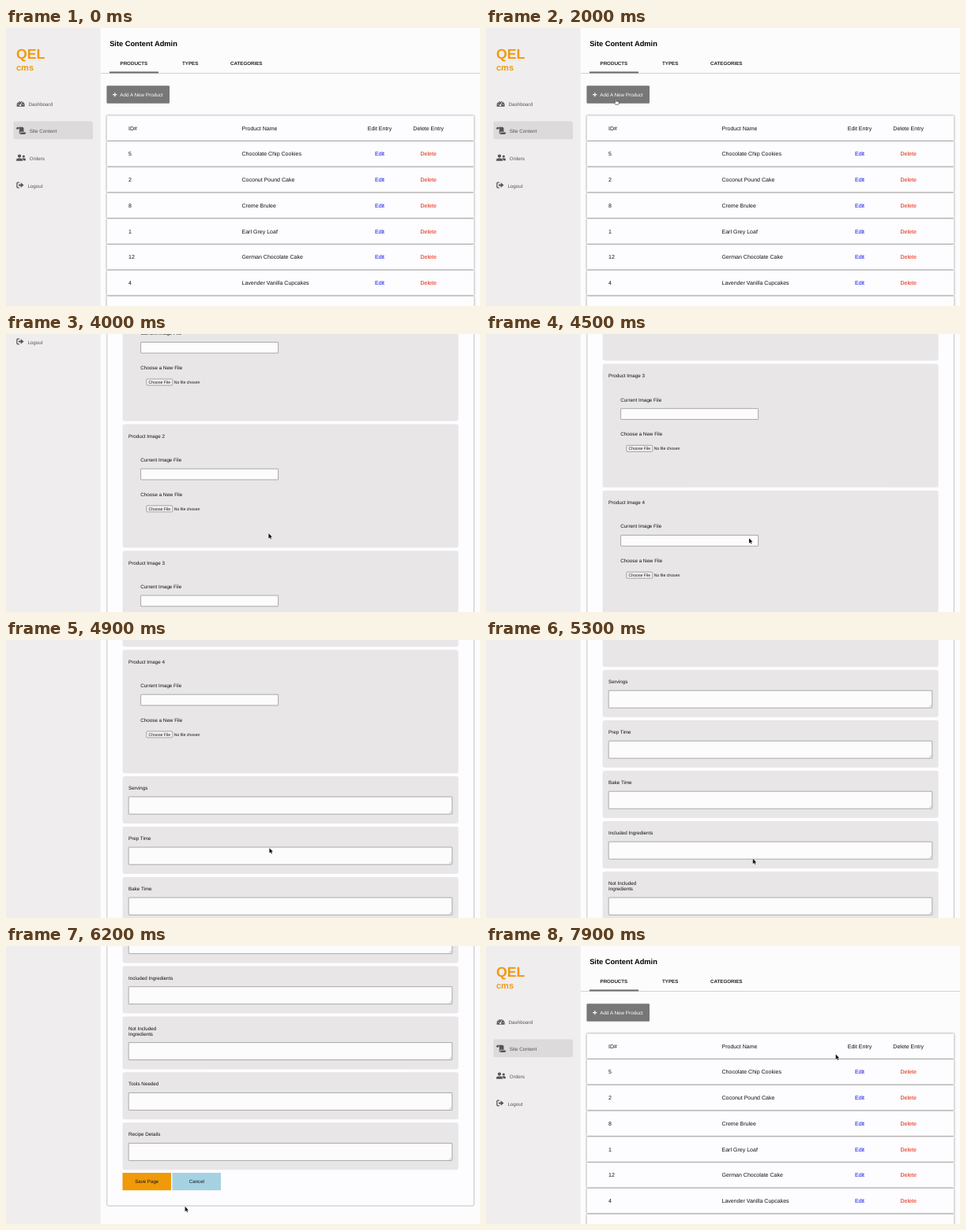
An HTML page for the animation above (8 s loop, 600 by 353 pixels).

```html
<!DOCTYPE html>
<html lang="en">
<head>
<meta charset="utf-8">
<title>Site Content Admin</title>
<style>
  html, body { margin: 0; width: 100%; height: 100%; overflow: hidden; background: #fdfcfd; }
  svg { display: block; position: absolute; left: 0; top: 0; }
  text { font-family: "Liberation Sans", Arial, Helvetica, sans-serif; fill: #111; text-rendering: geometricPrecision; }
  .bold { font-weight: 700; }
  .nav { fill: #555; }
  .mid { text-anchor: middle; }
  .row { fill: #fdfcfe; filter: drop-shadow(0 .5px 1px rgba(0, 0, 0, .55)); }
  .panel { fill: #e8e6e7; }
  .field { fill: #fdfcfd; stroke: #8c8b8c; stroke-width: .7; }
  .icon { fill: #555; }
  .line { fill: none; stroke: #555; stroke-width: 1.3; }
</style>
</head>
<body>
<svg id="stage" width="600" height="353" viewBox="0 0 600 353"></svg>
<script>
const LOOP = 8000, STEP = 100;
const FORM_AT = 2200, LIST_AT = 7300;

// y is the middle of the capitals
const text = (x, y, size, str, cls = '', fill = '') =>
  `<text x="${x}" y="${y + size * .355}" font-size="${size}" class="${cls}"${fill && ` style="fill:${fill}"`}>${str}</text>`;
const rect = (x, y, w, h, attrs = '') =>
  `<rect x="${x}" y="${y}" width="${w}" height="${h}" ${attrs}/>`;
const path = (d, attrs = '') => `<path d="${d}" ${attrs}/>`;

function sidebar() {
  const gauge = path('M13.6 99.7A5.2 5.2 0 1 1 23.6 99.7Z', 'class="icon"') +
    path('M18.2 98.2L20.6 93.6', 'stroke="#efedee" stroke-width=".9"') +
    '<circle cx="18.2" cy="98" r="1.2" fill="#efedee"/>' +
    [[15.4, 97.2], [16.2, 94.8], [18.3, 93.4], [21.7, 97.2]]
      .map(([x, y]) => `<circle cx="${x}" cy="${y}" r=".6" fill="#efedee"/>`).join('');
  const scroll = path('M13.2 128.6V127.4a1.6 1.6 0 0 1 3.2 0v1.2Z', 'class="icon"') +
    path('M15.4 125.8H20.6a1.9 1.9 0 0 1 1.9 1.9V131.7H17.9V133a1.2 1.2 0 0 1-1.2 1.2Q17 130 16.9 127.6Q16.8 126.3 15.4 125.8Z', 'class="icon"') +
    path('M18.7 132.4H25.2V133a2 2 0 0 1-2 2H17.2Q18.7 134.3 18.7 132.4Z', 'class="icon"');
  const people = '<circle cx="17" cy="162.6" r="2.1" class="icon"/><circle cx="22.3" cy="163" r="1.6" class="icon"/>' +
    path('M13.1 168.8V167.6Q13.1 165.4 15.3 165.4H18.7Q20.9 165.4 20.9 167.6V168.8Z', 'class="icon"') +
    path('M20.4 165.3H23Q25 165.3 25 167.2V168.2H21.6Q21.7 166.3 20.4 165.3Z', 'class="icon"');
  const leave = path('M16.8 196.2H15Q13.9 196.2 13.9 197.3V201.7Q13.9 202.8 15 202.8H16.8', 'class="line"') +
    path('M16 198.4H18.7V196.2L22.5 199.5L18.7 202.8V200.6H16Z', 'class="icon"');
  return text(13, 32.8, 17.6, 'QEL', 'bold', '#f09a10') +
    text(13, 50, 11, 'cms', 'bold', '#f09a10') +
    rect(9.5, 118.5, 100.5, 22.8, 'rx="2" fill="#dcdadb"') +
    gauge + scroll + people + leave +
    text(28.6, 96.7, 6.24, 'Dashboard', 'nav') +
    text(29.8, 131.2, 6.24, 'Site Content', 'nav') +
    text(29.8, 165.8, 6.24, 'Orders', 'nav') +
    text(27.4, 200.3, 6.24, 'Logout', 'nav');
}

function header() {
  return text(131.2, 20, 9.27, 'Site Content Admin', 'bold', '#000') +
    text(144.5, 44.8, 6.2, 'PRODUCTS', 'bold', '#222') +
    text(223, 44.8, 6.2, 'TYPES', 'bold', '#222') +
    text(284, 44.8, 6.2, 'CATEGORIES', 'bold', '#222') +
    rect(120, 57, 480, .8, 'fill="#c9c8ca"') +
    rect(131, 55.4, 62, 2, 'fill="#6b6b6b"');
}

function list() {
  const items = [[5, 'Chocolate Chip Cookies'], [2, 'Coconut Pound Cake'], [8, 'Creme Brulee'],
    [1, 'Earl Grey Loaf'], [12, 'German Chocolate Cake'], [4, 'Lavender Vanilla Cupcakes']];
  const top = i => 111.2 + i * 32.75;
  const row = i => rect(127.5, top(i), 465, 31.9, 'rx="1" class="row"');
  let out = rect(127.4, 73.2, 79.6, 22.6, 'rx="1.2" fill="#777"') +
    path('M135.2 84.6H140.4M137.8 82V87.2', 'stroke="#fff" stroke-width="1.1"') +
    text(144.3, 84.6, 6.3, 'Add A New Product', '', '#fff') +
    row(0) + text(155, 127.2, 7.04, 'ID#') + text(298.5, 127.2, 7.04, 'Product Name') +
    text(473, 127.2, 7.04, 'Edit Entry', 'mid') + text(534.7, 127.2, 7.04, 'Delete Entry', 'mid');
  items.forEach(([id, name], i) => {
    const y = top(i + 1) + 16;
    out += row(i + 1) + text(155, y, 7.04, id) + text(298.5, y, 7.04, name) +
      text(473, y, 7.04, 'Edit', 'mid', '#1010e8') + text(534.7, y, 7.04, 'Delete', 'mid', '#e0240f');
  });
  return out + row(7);
}

const panel = (y, h) => rect(147.6, y, 425, h, 'rx="3" class="panel"');
const label = (x, y, str) => text(x, y, 6.27, str);
const field = (x, y, w, h) => rect(x, y, w, h, 'rx=".6" class="field"');

function imagePanel(i) {
  const y = 143.6 + i * 160.8;
  return panel(y, 156.8) + label(155, y + 15.2, 'Product Image ' + (i + 1)) +
    label(170.3, y + 45.5, 'Current Image File') + field(170.6, y + 56.8, 174, 13.8) +
    label(170.3, y + 89.3, 'Choose a New File') +
    rect(177.8, y + 103.5, 33, 8, 'rx="1.2" fill="#f1f0f1" stroke="#777" stroke-width=".6"') +
    text(180.6, y + 107.5, 5.15, 'Choose File') + text(212.8, y + 107.5, 5.15, 'No file chosen');
}

function areaPanel(y, ...lines) {
  const extra = (lines.length - 1) * 7;
  const base = y + 26.2 + extra;
  return panel(y, 60 + extra) +
    lines.map((str, i) => label(155, y + 15 + i * 7.1, str)).join('') +
    field(155.2, base, 409.6, 22) +
    path(`M561 ${base + 21}l3-3M562.8 ${base + 21}l1.2-1.2`, 'stroke="#999" stroke-width=".5"');
}

function form() {
  return rect(127.8, 73.3, 464.6, 1209.7, 'rx="2" fill="#fdfcfe" stroke="#c3c2c5" stroke-width="1"') +
    panel(93, 46.8) + label(155, 108, 'Product Name') + field(155.2, 119.2, 409.6, 13.8) +
    [0, 1, 2, 3].map(imagePanel).join('') +
    areaPanel(786.5, 'Servings') + areaPanel(850.5, 'Prep Time') +
    areaPanel(914.5, 'Bake Time') + areaPanel(978.5, 'Included Ingredients') +
    areaPanel(1042.4, 'Not Included', 'Ingredients') +
    areaPanel(1113.2, 'Tools Needed') + areaPanel(1177.2, 'Recipe Details') +
    rect(147.5, 1241, 61.5, 22.2, 'fill="#f09a08"') + text(178.2, 1252.2, 6.15, 'Save Page', 'mid') +
    rect(210.5, 1241, 61.5, 22.2, 'fill="#a5d2e2"') + text(241.4, 1252.2, 6.15, 'Cancel', 'mid');
}

const arrow = path('M0 0V6.4L1.5 5L2.5 7.3L3.5 6.9L2.5 4.6H4.5Z',
  'id="arrow" fill="#111" stroke="#fff" stroke-width=".6" paint-order="stroke"');
const hand = path('M-.7 .6Q0-.4 .7 .6V3Q1.6 2.4 2 3.2Q2.8 2.8 3.2 3.6Q4 3.6 4 4.4Q4 6 3.2 7H-.6Q-1.4 5.6-2.3 4.5Q-2-.2+3.6-.7 4.4Z'.replace('Q-2-.2+3.6-.7 4.4', 'Q-2 3.6-.7 4.3'),
  'id="hand" fill="#fff" stroke="#222" stroke-width=".6"');

const stage = document.getElementById('stage');
stage.innerHTML = rect(0, 0, 600, 353, 'fill="#fdfcfd"') + rect(0, 0, 119.8, 353, 'fill="#efedee"') +
  `<g id="page">${sidebar()}${header()}<g id="list">${list()}</g><g id="form">${form()}</g></g>` +
  `<g id="cursor">${arrow}${hand}</g>`;
const [page, listView, formView, cursor, arrowTip, handTip] =
  ['page', 'list', 'form', 'cursor', 'arrow', 'hand'].map(id => document.getElementById(id));

// [time, scroll]
const scrollKeys = [[2800, 0], [3100, 50], [3400, 110], [3500, 110], [3700, 128], [4000, 190],
  [4300, 322], [4600, 480], [4900, 613.6], [5100, 688], [5300, 748.5], [5600, 842], [5900, 922], [6200, 953]];
// [time, x, y]
const cursorKeys = [[500, 330, 240], [800, 268, 166], [1200, 207, 98], [1300, 194, 88], [1400, 176, 87],
  [1500, 176, 87], [1800, 164.5, 90.2], [2200, 164.5, 90.2], [2800, 270, 188], [3300, 332, 252],
  [4000, 332.4, 253.2], [4900, 333.4, 264.2], [5300, 337.8, 277.8], [5700, 336, 281], [6200, 226.6, 330.8],
  [6500, 192, 299], [6700, 192, 299], [7000, 249, 298], [7300, 249, 298], [7900, 442.7, 137.6]];

function at(keys, t) {
  const next = keys.findIndex(k => k[0] > t);
  if (next === 0) return keys[0].slice(1);
  if (next < 0) return keys[keys.length - 1].slice(1);
  const a = keys[next - 1], b = keys[next], p = (t - a[0]) / (b[0] - a[0]);
  return a.slice(1).map((v, i) => v + (b[i + 1] - v) * p);
}

const show = (el, on) => el.setAttribute('visibility', on ? 'visible' : 'hidden');
const inside = (x, y, l, t, r, b) => x > l && x < r && y > t && y < b;

function draw() {
  const t = Math.floor(performance.now() % LOOP / STEP) * STEP;
  const editing = t >= FORM_AT && t < LIST_AT;
  const scroll = editing ? at(scrollKeys, t)[0] : 0;
  const [x, y] = at(cursorKeys, t);
  const pointing = editing
    ? inside(x, y + scroll, 147, 1241, 272, 1263)
    : inside(x, y, 127, 73, 207, 96);
  page.setAttribute('transform', `translate(0 ${-scroll})`);
  show(listView, !editing);
  show(formView, editing);
  cursor.setAttribute('transform', `translate(${x} ${y})`);
  show(arrowTip, t >= 500 && !pointing);
  show(handTip, t >= 500 && pointing);
  requestAnimationFrame(draw);
}
draw();
</script>
</body>
</html>
```
